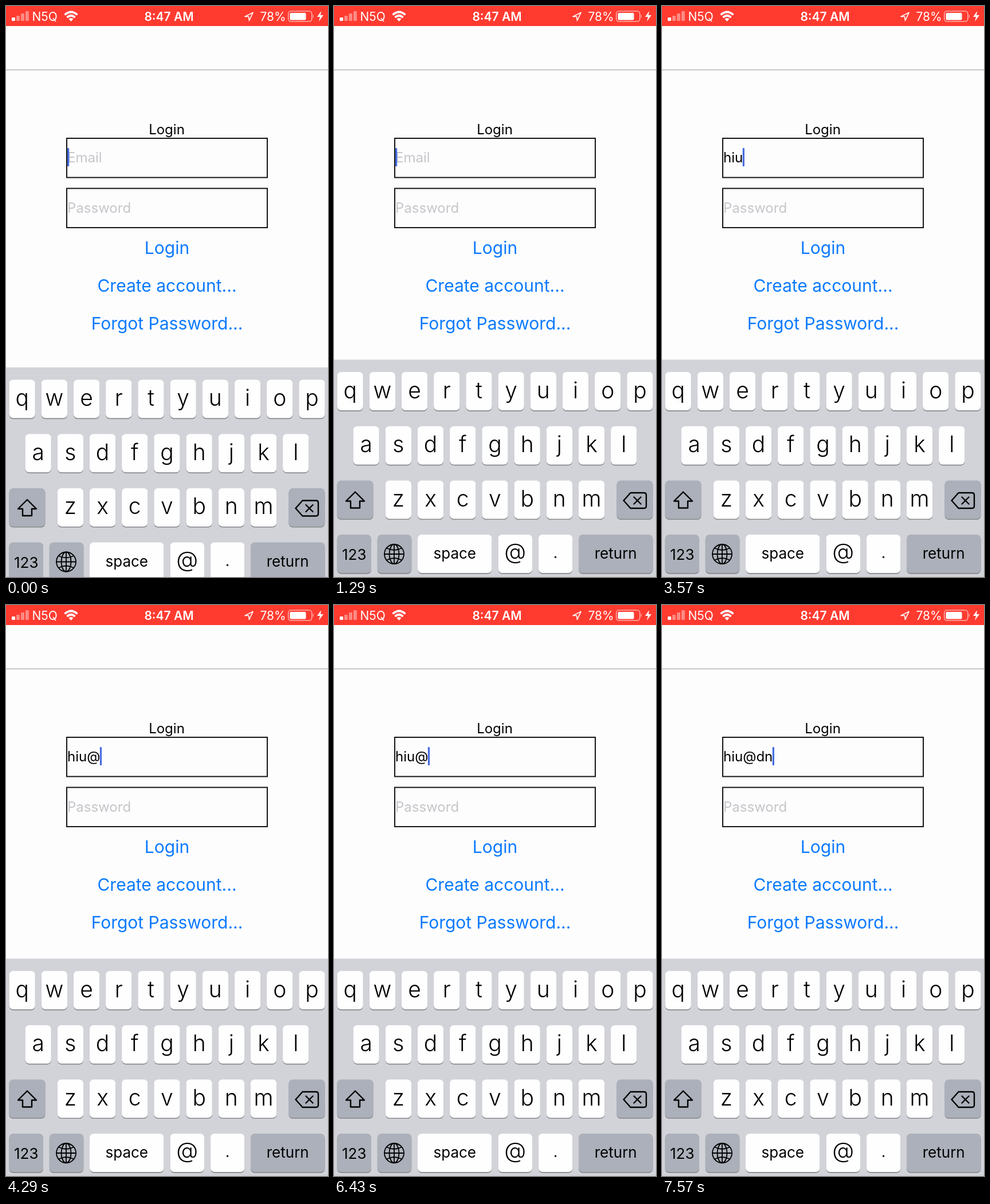
Animation of 562 by 997 pixels, one loop 8 s. Source, as an HTML page:

```html
<!DOCTYPE html>
<html lang="en">
<head>
<meta charset="utf-8">
<title>Login form</title>
<style>
  html, body { margin: 0; width: 100%; height: 100%; overflow: hidden; background: #fefdfe; }
  svg { display: block; width: 100vw; height: 100vh; font-family: Inter, "Liberation Sans", sans-serif; }
  .mid { text-anchor: middle; }
  .status { font-size: 21px; fill: #fff; }
  .field { fill: none; stroke: #151515; stroke-width: 2; }
  .body { font-size: 24px; }
  .hint { fill: #c5c5ca; }
  .link { font-size: 30px; fill: #0a7aff; }
  .letter { font-size: 39px; font-weight: 350; }
  .label { font-size: 26px; }
  .big { font-size: 60px; font-weight: 300; }
  .icon { fill: none; stroke: #000; stroke-width: 2.4; stroke-linejoin: round; stroke-linecap: round; }
  #popup path { fill: #fefefe; filter: drop-shadow(0 1px 3px #0006); }
</style>
</head>
<body>
<svg viewBox="0 0 562 997" preserveAspectRatio="none">
  <rect width="562" height="35" fill="#ff3b30"/>
  <g fill="#fff">
    <rect x="10" y="20" width="6" height="6" rx="1"/>
    <g opacity=".4">
      <rect x="18" y="17" width="6" height="9" rx="1"/>
      <rect x="26" y="13" width="6" height="13" rx="1"/>
      <rect x="34" y="9" width="6" height="17" rx="1"/>
    </g>
    <path d="M113.500 27l-4-4.500q4-3 8 0z"/>
    <rect x="495.500" y="12" width="28" height="12.500" rx="2"/>
    <path d="M535.500 14.500q3 3.500 0 7z" opacity=".6"/>
    <path d="M550 9l-7 10h5l-2 8 8-11h-5z"/>
  </g>
  <g fill="none" stroke="#fff">
    <path d="M102.500 15.500q11-10 22 0M106.500 20q7-6.500 14 0" stroke-width="3.600"/>
    <rect x="492.700" y="9" width="41" height="18" rx="4.500" stroke-width="1.500" opacity=".6"/>
    <path d="M417 18.500L431 11.500 424.500 25.500 423.500 18.500z" stroke-width="1.700" stroke-linejoin="round"/>
  </g>
  <text class="status" x="45.500" y="26">N5Q</text>
  <text class="status mid" x="284.500" y="26" font-weight="600">8:47 AM</text>
  <text class="status" x="443.500" y="26">78%</text>
  <path d="M0 111.500H562" stroke="#b4b4b6" stroke-width="1.400"/>

  <text class="body mid" x="280.500" y="224">Login</text>
  <rect class="field" x="106" y="231" width="350" height="68.500"/>
  <rect class="field" x="106" y="318.500" width="350" height="68.500"/>
  <text class="body" id="email" x="107" y="273"></text>
  <text class="body hint" x="107" y="361">Password</text>
  <rect id="caret" y="248" width="3.200" height="32" rx="1" fill="#466be0"/>
  <text class="link mid" x="281" y="432.500">Login</text>
  <text class="link mid" x="281" y="498.500">Create account...</text>
  <text class="link mid" x="281" y="564.500">Forgot Password...</text>

  <g id="keyboard">
    <rect y="617.500" width="562" height="400" fill="#d1d3d8"/>
    <g id="keys"></g>
    <g class="icon">
      <path d="M37 848.500L53 864.500H45V876.500H29V864.500H21z"/>
      <path d="M517.500 850H541q4 0 4 4V873q0 4-4 4H517.500L505.500 863.500zM523.500 857.500l12 12m0-12l-12 12"/>
      <g stroke-width="1.800">
        <circle cx="105" cy="957" r="17"/>
        <ellipse cx="105" cy="957" rx="8.500" ry="17"/>
        <path d="M105 940v34M88 957h34M92 946.500q13 7 26 0M92 967.500q13-7 26 0"/>
      </g>
    </g>
    <g id="popup"></g>
  </g>
</svg>
<script>
const $ = id => document.getElementById(id);
const LOOP = 8000, FPS = 7, KEY_H = 67;
const keys = {};
let markup = "";

function addKey(name, x, y, w, textClass, baseline, dark) {
  keys[name] = { x, y, w };
  const box = `x="${x}" width="${w}" height="${KEY_H}" rx="7"`;
  markup += `<rect ${box} y="${y + 1.7}" fill="#888a8e"/>
    <rect ${box} y="${y}" fill="${dark ? "#abb0ba" : "#fefefe"}"/>`;
  if (textClass)
    markup += `<text class="mid ${textClass}" x="${x + w / 2}" y="${y + baseline}">${name}</text>`;
}

[["qwertyuiop", 5.5], ["asdfghjkl", 33.5], ["zxcvbnm", 89.7]].forEach(([row, left], r) =>
  [...row].forEach((c, i) => addKey(c, left + 56.2 * i, 639 + 94.7 * r, 45.3, "letter", 45.5)));
addKey("shift", 5.5, 828.4, 63, "", 0, true);
addKey("delete", 493.5, 828.4, 63, "", 0, true);
addKey("123", 5.5, 923, 59.5, "label", 44, true);
addKey("globe", 75.8, 923, 59.5, "", 0, true);
addKey("space", 146, 923, 129.500, "label", 42);
addKey("@", 286.5, 923, 59.5, "letter", 43);
addKey(".", 356.8, 923, 59.5, "label", 41);
addKey("return", 427, 923, 129.5, "label", 42, true);
$("keys").innerHTML = markup;

// Key presses: [character, frame pressed, frame released]
const presses = [["h", 11, 12], ["i", 14, 15], ["u", 17, 18], ["@", 29, 30], ["d", 46, 47], ["n", 52, 53]];
// Caret blink: [frame, opacity]
const blink = [[0, 1], [6, .5], [7, 0], [9, 1], [21, .7], [22, .3], [23, 0], [25, 1], [28, .5], [29, 1],
  [33, .7], [34, .3], [35, 0], [37, .5], [38, 1], [41, .5], [42, 0], [44, .5], [45, 1],
  [50, .5], [51, 0], [52, 1]];

function balloon(name) {
  const { x, y, w } = keys[name];
  return `<path d="M${x - 23} ${y - 93}q0-18 18-18H${x + w + 5}q18 0 18 18V${y - 32}
    c0 12-7 15-13 21s-10 9-10 19V${y + 60}q0 7-7 7H${x + 7}q-7 0-7-7V${y + 8}
    c0-10-4-13-10-19s-13-9-13-21z"/>
    <text class="mid big" x="${x + w / 2}" y="${y - 37}">${name}</text>`;
}

let shown = -1;
function draw(frame) {
  const typed = presses.filter(p => frame >= p[1]).map(p => p[0]).join("");
  const held = presses.find(p => frame >= p[1] && frame < p[2]);
  const email = $("email");
  email.textContent = typed || "Email";
  email.classList.toggle("hint", !typed);
  $("caret").setAttribute("x", typed ? 106.5 + email.getComputedTextLength() : 107);
  $("caret").setAttribute("opacity", blink.findLast(b => frame >= b[0])[1]);
  $("popup").innerHTML = held ? balloon(held[0]) : "";
  const drop = 13.5 * Math.exp(-1.69 * frame);
  $("keyboard").setAttribute("transform", `translate(0 ${drop < .3 ? 0 : drop})`);
}

function tick() {
  const frame = Math.floor((performance.now() % LOOP + 3) * FPS / 1000) % (LOOP * FPS / 1000);
  if (frame !== shown) draw(shown = frame);
  requestAnimationFrame(tick);
}
tick();
</script>
</body>
</html>
```
